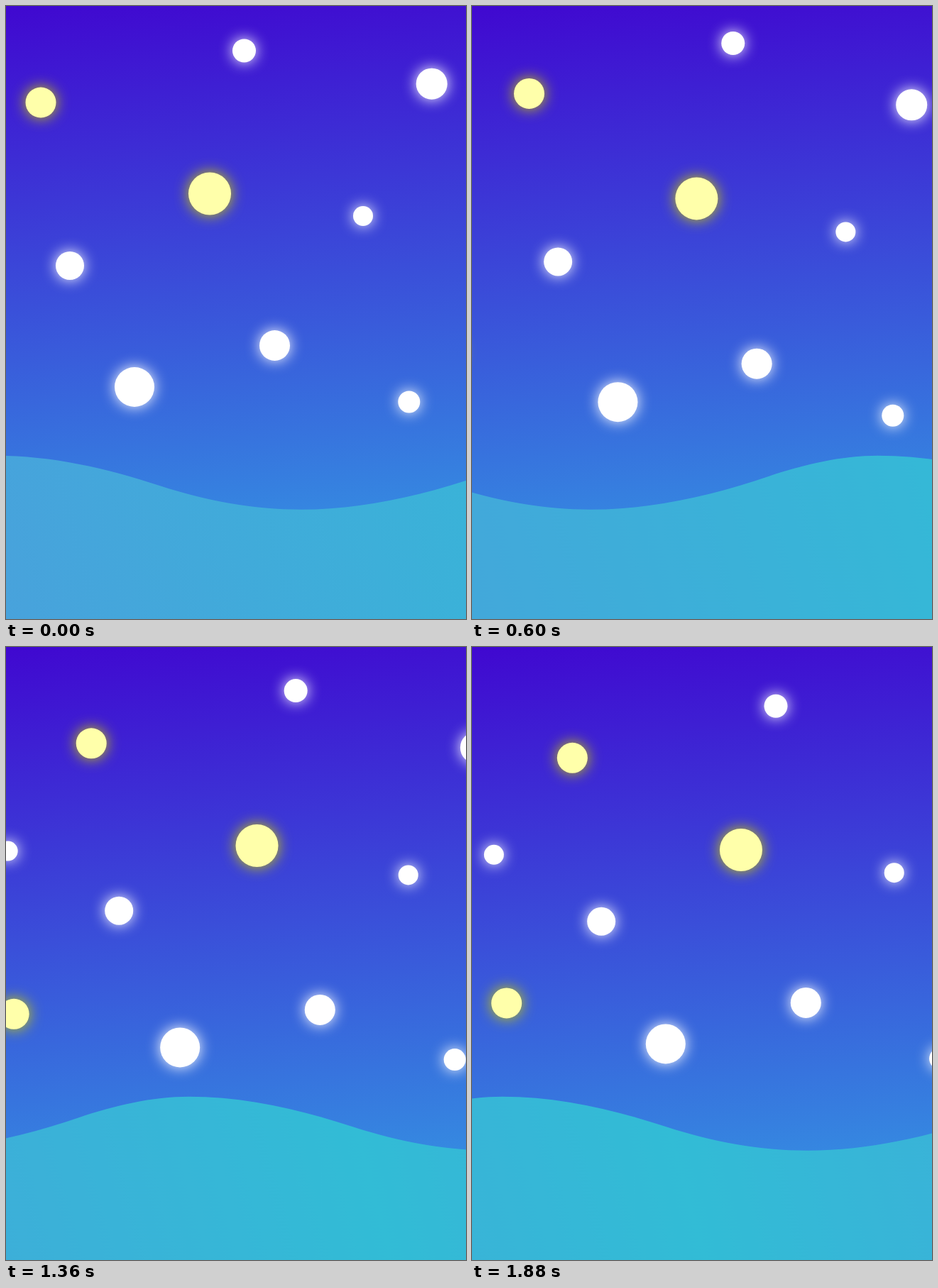
An HTML page for the animation above (1920 ms loop, 648x864 px).

```html
<!DOCTYPE html>
<html lang="en">
<head>
<meta charset="utf-8">
<title>Night waves</title>
<style>
  html, body { margin: 0; width: 100%; height: 100%; overflow: hidden; }
  #stage {
    position: relative; width: 648px; height: 864px; overflow: hidden;
    background: linear-gradient(175deg, #4008d0, #33a3e4);
  }
  .star {
    position: absolute; left: 0; top: 0; border-radius: 50%;
    background: #fff; box-shadow: 0 0 20px #fff;
    offset-rotate: 0deg;
    animation: drift 1920ms steps(48) infinite;
  }
  .gold { background: #ffa; box-shadow: 0 0 20px #cc0; }
  svg { position: absolute; left: 0; top: 0; }
  #wave { animation: roll 1920ms steps(48) infinite; }
  @keyframes drift { from { offset-distance: 0%; } to { offset-distance: 100%; } }
  @keyframes roll { to { transform: translateX(-793.9px); } }
</style>
</head>
<body>
<div id="stage">
  <svg width="648" height="864">
    <defs>
      <linearGradient id="sea" gradientUnits="userSpaceOnUse" spreadMethod="reflect"
        x1="-60" y1="680" x2="981.3" y2="401">
        <stop offset="0" stop-color="#48a2dc"/>
        <stop offset="1" stop-color="#32bcd6"/>
      </linearGradient>
    </defs>
    <path id="wave" fill="url(#sea)"/>
  </svg>
</div>
<script>
  const stage = document.getElementById('stage');

  // One swell: crest, slope, trough, slope, next crest
  const swell = 'c78 0 155 17.5 231 42.5c66 21.5 131 33.5 199 33.5' +
    'c85 0 174-20.5 249-46.5c50-17 103-29.5 155-29.5';
  document.getElementById('wave').setAttribute('d', 'M-14 633.8' + swell + swell + 'V870H-14Z');

  function addStar(r, path, gold) {
    const el = document.createElement('div');
    el.className = gold ? 'star gold' : 'star';
    el.style.width = el.style.height = 2 * r + 'px';
    el.style.offsetPath = `path("${path}")`;
    stage.append(el);
  }

  // All drift by the same vector; bulge arches the way sideways, lean shifts the arch to the start
  const dx = 93.9, dy = 22, dist = Math.hypot(dx, dy), steps = 32;
  function drifter(x, y, r, bulge, lean, gold) {
    const pts = [];
    for (let i = 0; i <= steps; i++) {
      const u = i / steps, a = Math.PI * u;
      const side = bulge * (Math.sin(a) + lean * Math.sin(2 * a)) / dist;
      pts.push(`${x + dx * u - dy * side} ${y + dy * u + dx * side}`);
    }
    addStar(r, 'M' + pts.join('L'), gold);
  }

  drifter(335.5, 63, 16.5, -22.8, -0.04);
  drifter(49, 136, 21.5, -23, 0.06, true);
  drifter(287, 264.5, 30, 0, 0, true);
  drifter(90, 366, 20, -14.3, 0.07);
  drifter(181, 537, 28, 17.1, 0.08);
  drifter(378.5, 478.5, 21.5, 24, 0.04);
  drifter(503, 296, 14, 16.8, 0.2);
  drifter(567.8, 558, 15.5, 13.3, 0.18);
  drifter(599.5, 109.5, 21.8, 26.8, 0.17);

  // Stars coming in from the left
  addStar(21.5, 'M-75 462L-13.5 500.5C-5 514-2 522 10.5 517.5L34 509L51.5 500.6', true);
  addStar(14, 'M-68 310C-30 288-12 281 33.2 293.4');
</script>
</body>
</html>
```
